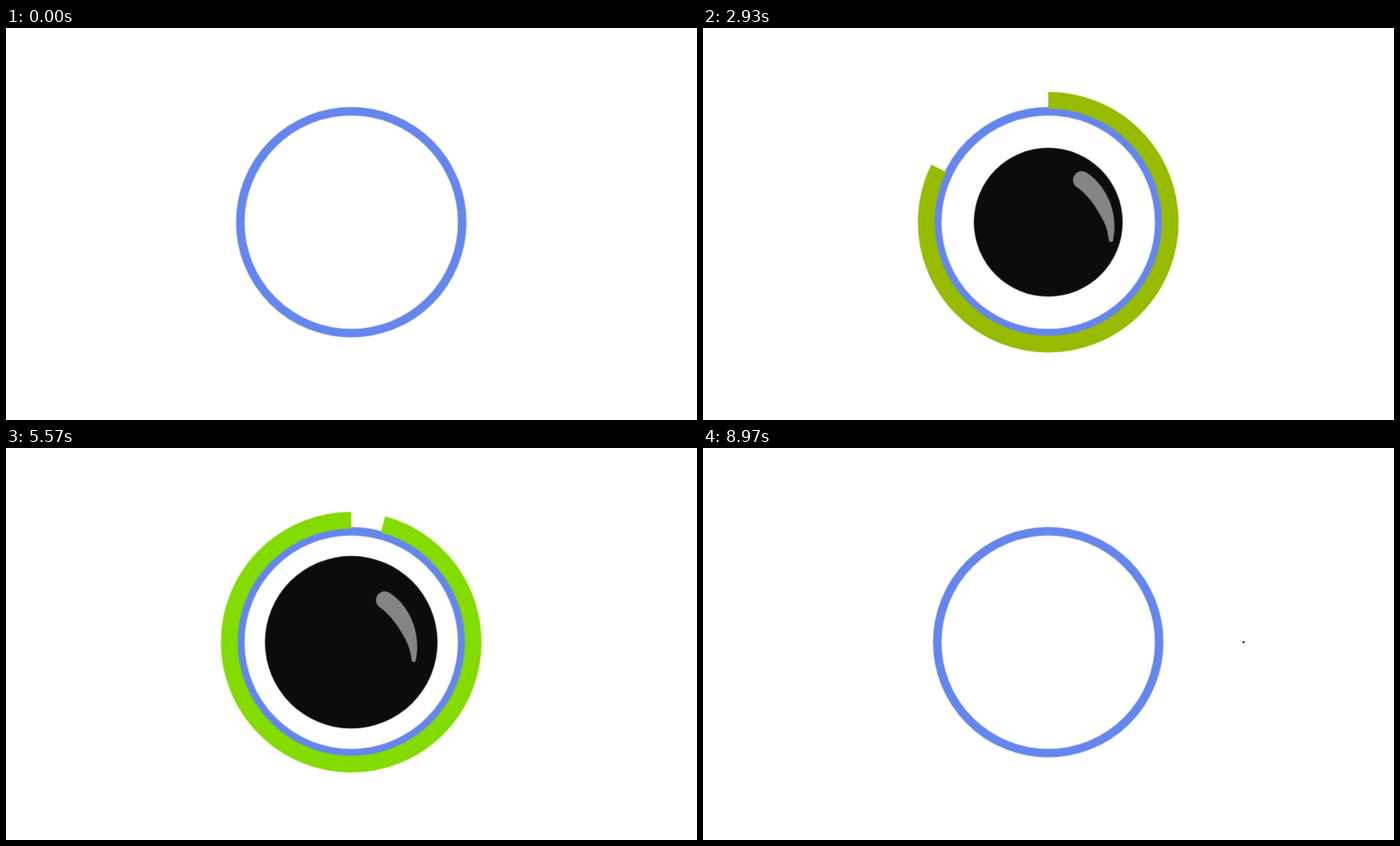
An HTML page without scripts that plays this animation: 994 px wide and 564 px high, repeating every 9010 ms.

```html
<!DOCTYPE html>
<html lang="en">
<head>
<meta charset="utf-8">
<title>Filling ring</title>
<style>
  :root {
    --loop: 9.01s;
    --beat: calc(var(--loop) / 18);
    --smooth: cubic-bezier(.333, 0, .667, 1);
  }
  html, body { margin: 0; width: 100%; height: 100%; overflow: hidden; background: #fff; }
  svg { display: block; width: 994px; height: 564px; }

  .ball, .pellet { fill: #0c0c0c; }
  .gloss { fill: #858585; animation: gloss var(--loop) var(--smooth) infinite; }
  .grow { animation: grow var(--loop) var(--smooth) infinite; }
  .ring { fill: none; stroke: #6586ec; stroke-width: 12.3; }
  .arc {
    fill: none; stroke-width: 24; stroke-dasharray: 360 400;
    animation: sweep var(--loop) var(--smooth) infinite, tint var(--loop) linear infinite;
  }

  .arrivals { animation: arrivals var(--loop) step-end infinite; }
  .departures { animation: departures var(--loop) step-end infinite; }
  .in { animation: in var(--beat) cubic-bezier(.42, 0, .684, 1) infinite; }
  .out { animation: out var(--beat) cubic-bezier(.36, 0, .667, 1) infinite; }
  .out .pellet { animation: shrink var(--beat) linear infinite; }

  @keyframes arrivals { 0% { opacity: 0 } .15% { opacity: 1 } 44.44%, 100% { opacity: 0 } }
  @keyframes departures { 0% { opacity: 0 } 55.56%, 100% { opacity: 1 } }
  @keyframes in { from { transform: translateX(-280px) } to { transform: none } }
  @keyframes out { 0% { transform: translateX(0) } 92%, 100% { transform: translateX(281px) } }
  @keyframes shrink { 0%, 53.3% { transform: scale(1) } 92%, 100% { transform: scale(.045) } }

  @keyframes sweep {
    0% { stroke-dashoffset: 360px; opacity: 1 }
    44.44% { stroke-dashoffset: 0px }
    55.56% { stroke-dashoffset: 0px; animation-timing-function: cubic-bezier(.333, 0, .833, .833) }
    99.5% { stroke-dashoffset: -360px; opacity: 1 }
    99.51%, 100% { stroke-dashoffset: -360px; opacity: 0 }
  }
  @keyframes tint {
    0%, 100% { stroke: #f00 }
    44.44%, 55.56% { stroke: #70ff00 }
  }

  /* one step up per arrival, a pop when full, one step down per departure */
  @keyframes grow {
    0%, 5.54% { transform: scale(0) }
    5.56%, 9.26% { transform: scale(.32) }
    10.93%, 14.81% { transform: scale(.48) }
    16.48%, 20.37% { transform: scale(.64) }
    22.04%, 25.93% { transform: scale(.8) }
    27.59%, 31.48% { transform: scale(.96) }
    33.15%, 37.04% { transform: scale(1.12) }
    38.7%, 42.52% { transform: scale(1.28) }
    45.15% { transform: scale(2.44) }
    48.15%, 55.74% { transform: scale(1.44) }
    57.41%, 61.3% { transform: scale(1.28) }
    62.96%, 66.85% { transform: scale(1.12) }
    68.52%, 72.41% { transform: scale(.96) }
    74.07%, 77.96% { transform: scale(.8) }
    79.63%, 83.52% { transform: scale(.64) }
    85.19%, 89.07% { transform: scale(.48) }
    90.74%, 94.43% { transform: scale(.32) }
    94.45%, 100% { transform: scale(0) }
  }
  @keyframes gloss {
    0%, 42.52% { transform: scale(1) }
    45.15% { transform: scale(.64) }
    48.15%, 100% { transform: scale(.86) }
  }
</style>
</head>
<body>
<svg viewBox="0 0 994 564">
  <g transform="translate(496.6 279.4)">
    <g class="arrivals"><g class="in"><circle class="pellet" r="32"/></g></g>
    <g class="departures"><g class="out"><circle class="pellet" r="32"/></g></g>
    <g class="grow">
      <circle class="ball" r="100"/>
      <g class="gloss">
        <path transform="scale(.641)" d="M59-74A18.3 18.3 0 0 1 82-103C121-77 148-22 136 37A4.5 4.5 0 0 1 127 37C125 24 123 12 117 0C101-32 81-60 59-74Z"/>
      </g>
    </g>
    <circle class="ring" r="159.6"/>
    <circle class="arc" r="175.5" pathLength="360" transform="rotate(-90)"/>
  </g>
</svg>
</body>
</html>
```
